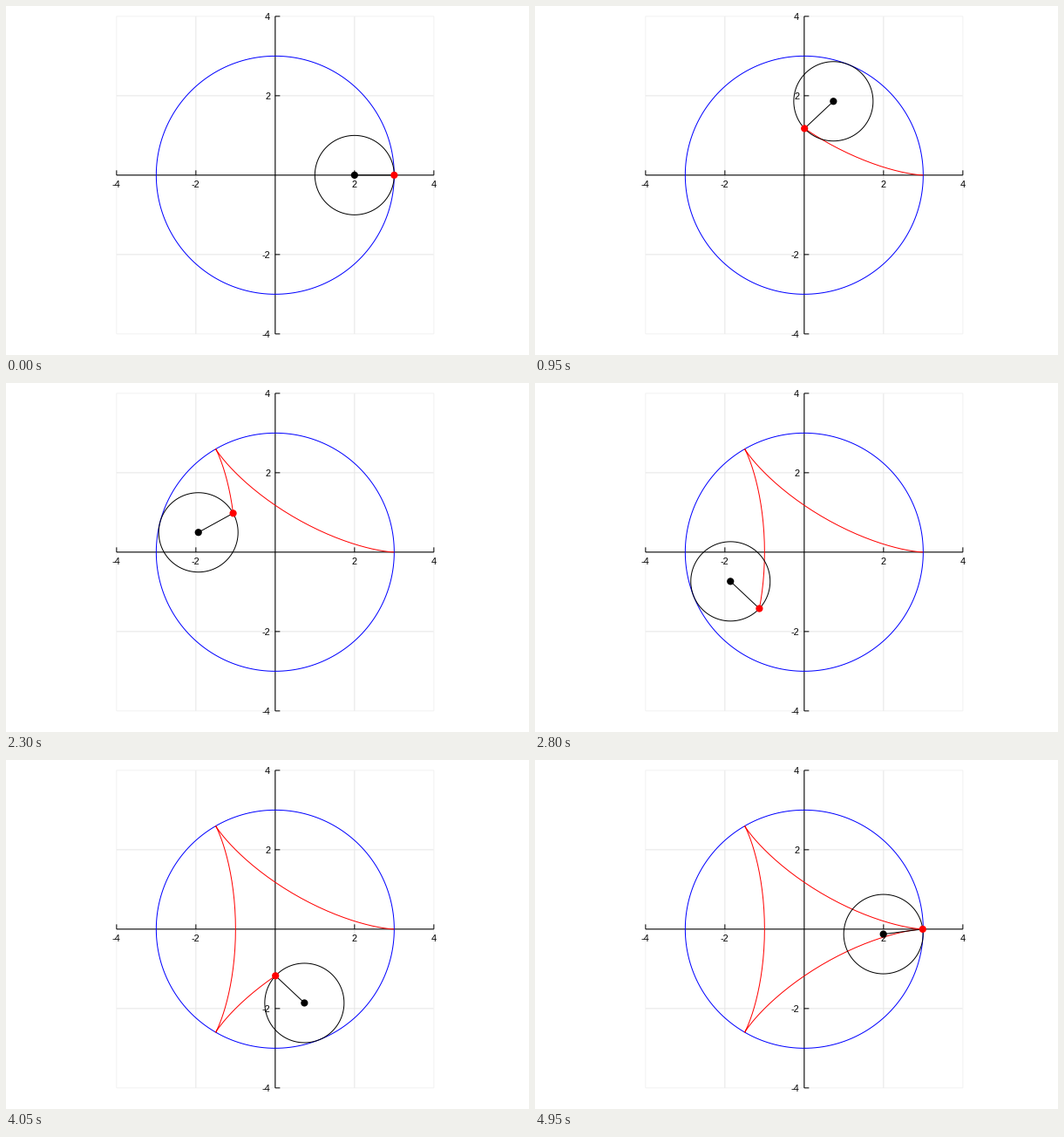
A matplotlib script that plays this animation: 600 by 400 pixels, repeating every 5 s.

```python
import numpy as np
import matplotlib.pyplot as plt
from matplotlib.animation import FuncAnimation
from matplotlib.patches import Circle

W, H, DPI = 600, 400, 100
FRAMES, INTERVAL = 100, 50
CX, CY, UNIT = 308.85, 193.85, 45.5   # origin and scale in pixels
PX = 72 / DPI                         # one pixel in points

plt.rcParams["font.family"] = "Liberation Sans"
fig = plt.figure(figsize=(W / DPI, H / DPI), dpi=DPI, facecolor="white")
ax = fig.add_axes([0, 0, 1, 1])
ax.set_xlim(0, W)
ax.set_ylim(H, 0)
ax.axis("off")


def to_px(x, y):
    return CX + UNIT * np.asarray(x), CY - UNIT * np.asarray(y)


def line(x, y, color, z, width=1.0):
    return ax.plot(*to_px(x, y), color=color, lw=width * PX, zorder=z,
                   solid_capstyle="butt", solid_joinstyle="round", snap=False)[0]


def dot(color, z):
    return ax.add_patch(Circle((0, 0), 4.1, fc=color, ec="none", zorder=z))


def label(x, y, value, align):
    ax.text(x, y, str(value), fontsize=11 * PX, color="black",
            ha=align, va="baseline", zorder=3)


# grid, ticks and labels
for v in (-4, -2, 2, 4):
    shade = "#f2f2f2" if abs(v) == 4 else "#e6e6e6"
    line([v, v], [-4, 4], shade, 1)
    line([-4, 4], [v, v], shade, 1)
    tick = 5.5 / UNIT
    line([v, v], [0, tick], "black", 2.5)
    line([0, tick], [v, v], "black", 2.5)
    px, py = to_px(v, v)
    label(px - 0.4, 208, v, "center")
    label(303.3, py + 4, v, "right")
line([-4, 4], [0, 0], "black", 2, 1.1)
line([0, 0], [-4, 4], "black", 2, 1.1)

# rolling circle parts
turn = np.linspace(0, 2 * np.pi, 201)
ring_x, ring_y = np.cos(turn), np.sin(turn)
line(3 * ring_x, 3 * ring_y, "blue", 4)
trace = line([], [], "red", 5)
wheel = line([], [], "black", 6)
arm = line([], [], "black", 7)
hub = dot("black", 8)
pen = dot("red", 9)


def deltoid(a):
    return 2 * np.cos(a) + np.cos(2 * a), 2 * np.sin(a) - np.sin(2 * a)


def update(i):
    angles = 2 * np.pi * np.arange(i + 1) / FRAMES
    a = angles[-1]
    hx, hy = 2 * np.cos(a), 2 * np.sin(a)
    x, y = deltoid(a)
    trace.set_data(*to_px(*deltoid(angles)))
    wheel.set_data(*to_px(hx + ring_x, hy + ring_y))
    arm.set_data(*to_px([hx, x], [hy, y]))
    hub.center = to_px(hx, hy)
    pen.center = to_px(x, y)
    return trace, wheel, arm, hub, pen


anim = FuncAnimation(fig, update, frames=FRAMES, interval=INTERVAL,
                     repeat=True, repeat_delay=0, blit=False)
plt.show()
```
